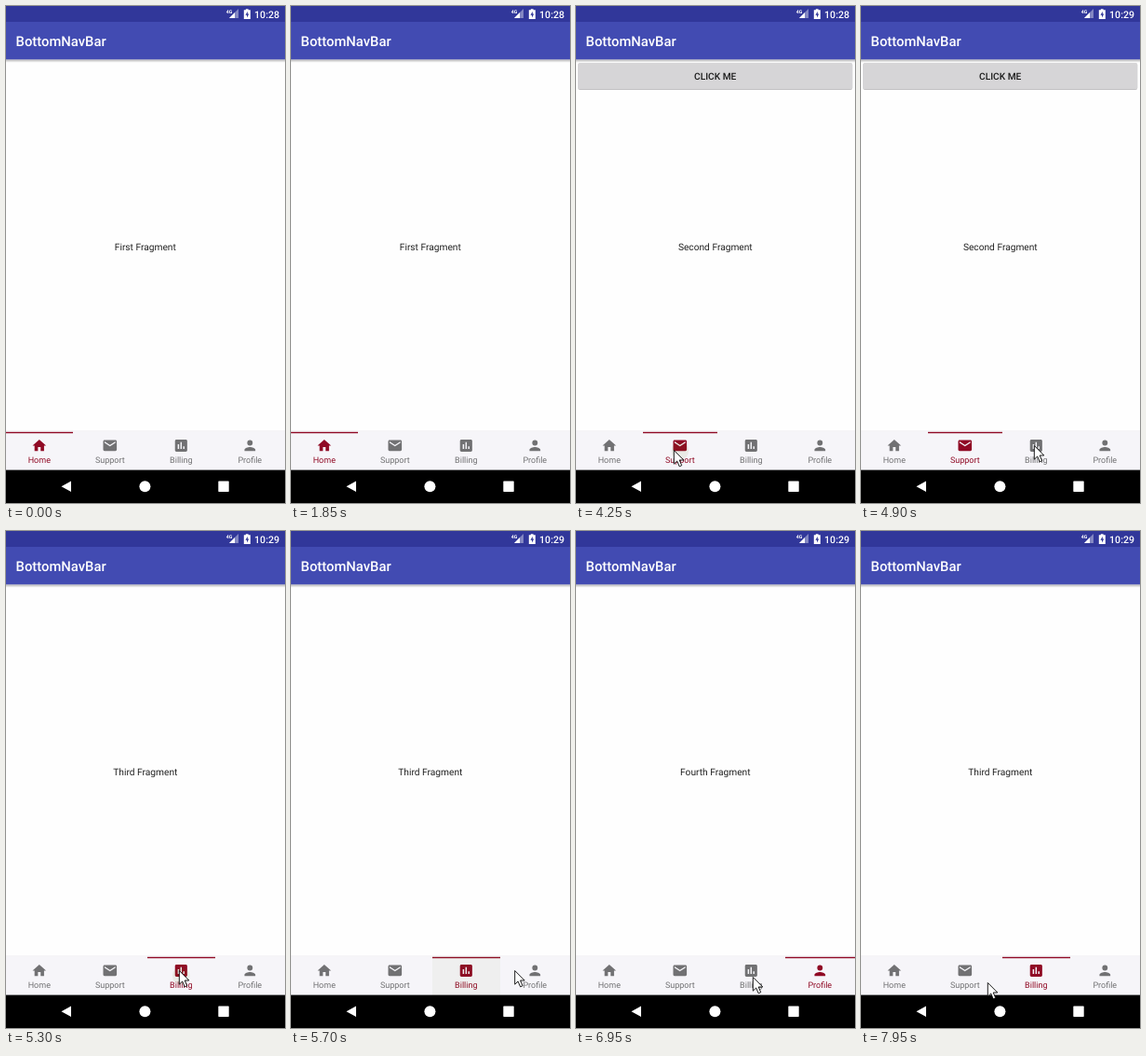
These frames come from a looping animation (300 by 533 pixels, 8 s). An HTML page:

```html
<!DOCTYPE html>
<html lang="en">
<head>
<meta charset="utf-8">
<title>Bottom navigation</title>
<style>
html, body { margin: 0; width: 100%; height: 100%; overflow: hidden; background: #fefefe; }
svg { display: block; width: 100vw; height: 100vh; font-family: Roboto, sans-serif; text-rendering: geometricPrecision; }
.tab { fill: #717173; font-size: 9px; text-anchor: middle; }
.tab.on { fill: #900a25; }
</style>
</head>
<body>
<svg viewBox="0 0 300 533" preserveAspectRatio="none">
  <defs>
    <linearGradient id="shade" x2="0" y2="1">
      <stop stop-color="#000" stop-opacity=".3"/>
      <stop offset="1" stop-color="#000" stop-opacity="0"/>
    </linearGradient>
  </defs>
  <rect width="300" height="533" fill="#fefefe"/>

  <g id="button">
    <rect x="2.2" y="61.5" width="295" height="28.5" rx="2" fill="#c2c1c3"/>
    <rect x="2.2" y="61" width="295" height="28" rx="1.5" fill="#d6d5d7"/>
    <text x="149.7" y="79.4" font-size="10.2" font-weight="500" text-anchor="middle" fill="#1c1c1c">CLICK ME</text>
  </g>
  <text id="label" x="149.8" y="261.9" font-size="10.2" text-anchor="middle" fill="#222"></text>

  <rect y="57.3" width="300" height="3.5" fill="url(#shade)"/>
  <rect y="17" width="300" height="40.3" fill="#424bb2"/>
  <rect width="300" height="17" fill="#31379a"/>
  <text x="10.6" y="43.2" font-size="14.8" font-weight="500" fill="#fff">BottomNavBar</text>

  <g fill="#fff">
    <path d="M250 3V13H240Z" opacity=".4"/>
    <path d="M246 7V13H240Z"/>
    <text x="236.8" y="7.6" font-size="5.2" font-weight="700">4G</text>
    <path d="M257.8 3.2h2.8v1h2.2v9.8h-7V4.2h2z"/>
    <path d="M259.8 5.8l-2.4 4h1.6v2.8l2.3-4h-1.5z" fill="#31379a"/>
    <text id="clock" x="294" y="12.6" font-size="10.6" font-weight="500" text-anchor="end"></text>
  </g>

  <rect y="455.5" width="300" height="1" fill="#efeef1"/>
  <rect y="456.3" width="300" height="42" fill="#f6f5f9"/>
  <g id="tabs"></g>
  <rect id="line" y="456.8" height="1.4" fill="#900a25"/>
  <clipPath id="clip"><rect id="clipBox" y="456.3" height="42"/></clipPath>
  <circle id="ripple" cy="477" fill="#5a7000" clip-path="url(#clip)"/>

  <rect y="497.6" width="300" height="36"/>
  <g fill="#fff">
    <path d="M59.5 515.2L70 509.4V521Z"/>
    <circle cx="149.4" cy="515.2" r="6"/>
    <rect x="228.3" y="509.5" width="11.4" height="11.4" rx=".6"/>
  </g>
  <path id="cursor" d="M.3.5V15.2L3.7 12L6.2 17.8L8.7 16.7L6.2 11H10.8Z" fill="#fff" stroke="#000" stroke-width=".9" stroke-linejoin="round"/>
</svg>
<script>
const $ = id => document.getElementById(id);
const set = (el, attrs) => Object.entries(attrs).forEach(([k, v]) => el.setAttribute(k, v));

const LOOP = 8000;
const edges = [0, 72, 152, 225, 300];
const tabs = [
  ['Home', 'First', 'M10 20v-6h4v6h5v-8h3L12 3 2 12h3v8z'],
  ['Support', 'Second', 'M20 4H4c-1.1 0-2 .9-2 2v12c0 1.1.9 2 2 2h16c1.1 0 2-.9 2-2V6c0-1.1-.9-2-2-2zm0 4l-8 5-8-5V6l8 5 8-5z'],
  ['Billing', 'Third', 'M19 3H5c-1.1 0-2 .9-2 2v14c0 1.1.9 2 2 2h14c1.1 0 2-.9 2-2V5c0-1.1-.9-2-2-2zM9 17H7v-7h2zm4 0h-2V7h2zm4 0h-2v-4h2z'],
  ['Profile', 'Fourth', 'M12 12a4 4 0 1 0 0-8 4 4 0 0 0 0 8zm0 2c-2.7 0-8 1.3-8 4v2h16v-2c0-2.7-5.3-4-8-4z']
];
const taps = [[-2000, 0], [4200, 1], [5250, 2], [6150, 3], [7050, 2]];
// Pointer stops: time, x, y
const stops = [
  [2800, 140, 440], [3200, 105, 476], [4350, 105, 476], [4800, 186, 471],
  [5350, 186, 471], [5680, 240.4, 471], [5800, 240.4, 471], [6050, 256, 475],
  [6400, 256, 475], [6850, 190, 478], [7450, 190, 478], [7900, 136, 484], [LOOP, 136, 484]
];

const middle = i => (edges[i] + edges[i + 1]) / 2 - .2;
$('tabs').innerHTML = tabs.map(([name, , icon], i) => `<g class="tab">
  <path transform="translate(${middle(i) - 8.76} 462.7) scale(.73)" fill-rule="evenodd" d="${icon}"/>
  <text x="${middle(i)}" y="489.7">${name}</text></g>`).join('');
const tabEls = [...$('tabs').children];

function drawCursor(t) {
  const i = stops.findIndex(s => s[0] > t);
  $('cursor').style.display = i > 0 ? '' : 'none';
  if (i < 1) return;
  const [t0, x0, y0] = stops[i - 1], [t1, x1, y1] = stops[i];
  const p = (t - t0) / (t1 - t0), e = p * p * (3 - 2 * p);
  set($('cursor'), { transform: `translate(${x0 + (x1 - x0) * e} ${y0 + (y1 - y0) * e})` });
}

function draw(t) {
  const [start, on] = taps.filter(tap => tap[0] <= t).pop();
  const span = { x: edges[on], width: edges[on + 1] - edges[on] };
  const age = t - start;
  tabEls.forEach((el, i) => el.classList.toggle('on', i === on));
  set($('line'), span);
  set($('clipBox'), span);
  set($('ripple'), {
    cx: middle(on),
    r: 46 * Math.min(1, age / 250),
    opacity: .08 * Math.max(0, Math.min(1, (600 - age) / 300))
  });
  $('label').textContent = tabs[on][1] + ' Fragment';
  $('button').style.display = on === 1 ? '' : 'none';
  $('clock').textContent = t < 4500 ? '10:28' : '10:29';
  drawCursor(t);
}

const began = performance.now();
function tick() {
  draw((performance.now() - began) % LOOP);
  requestAnimationFrame(tick);
}
tick();
</script>
</body>
</html>
```
